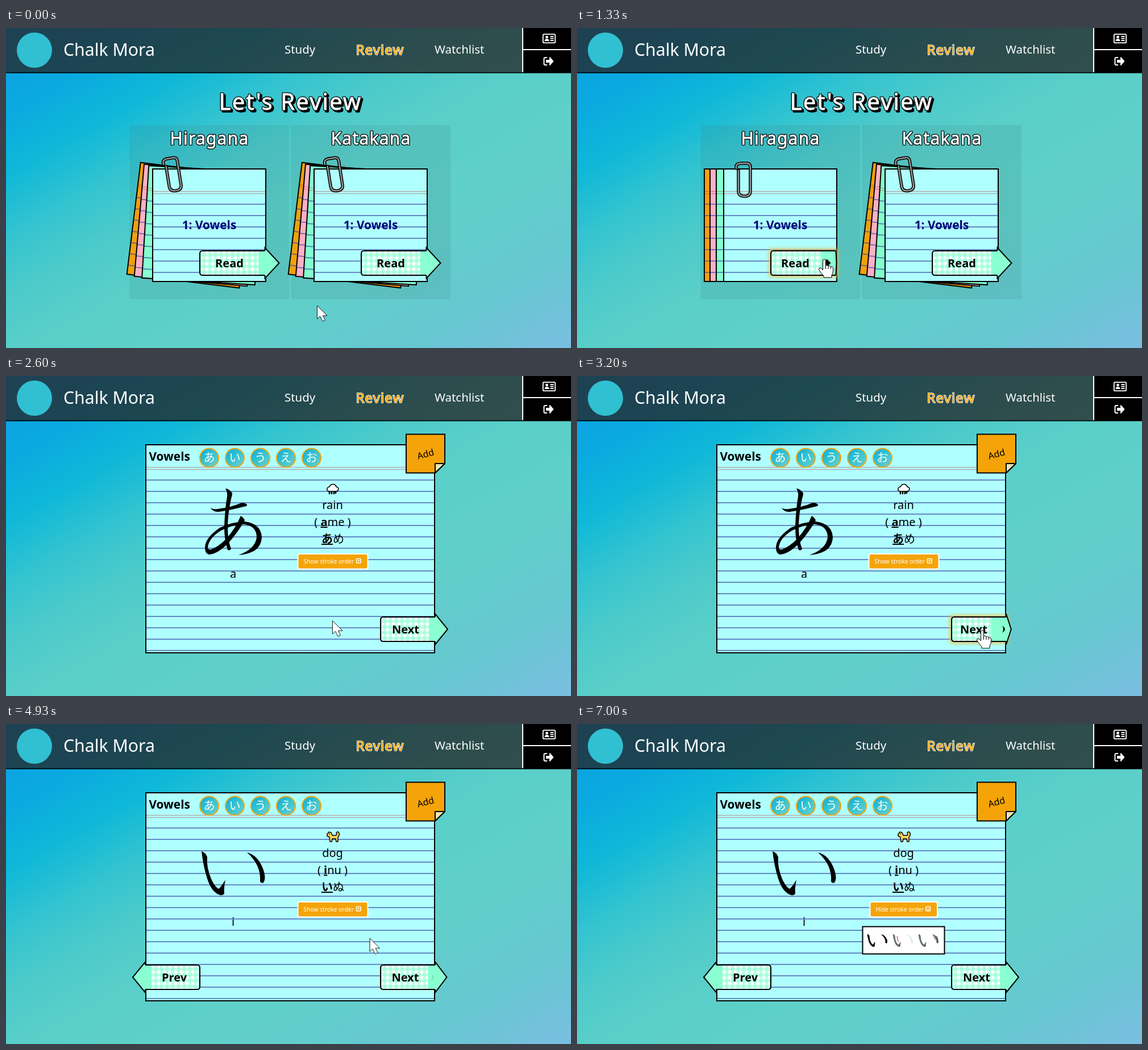
Write an HTML page that moves like this. It is 994 px wide and 563 px high and loops after 7120 ms.

```html
<!DOCTYPE html>
<html lang="en">
<head>
<meta charset="utf-8">
<title>Kana review</title>
<style>
@property --h { syntax: "<number>"; inherits: true; initial-value: 0; }
html, body { margin: 0; width: 100%; height: 100%; overflow: hidden; }
body {
  background: linear-gradient(to bottom right, #0e9fe4, #0aa9e0 13%, #0fb8d8 23%, #34c4d0 33%,
    #4ccaca 42%, #5acfc9 52%, #60cfc9 68%, #66c8d1 85%, #7abde0);
}
svg { display: block; width: 994px; height: 563px; }
text { font: 20px "Noto Sans", "Open Sans", sans-serif; }
.mid { text-anchor: middle; }
.bold { font-weight: 700; }
.kana { font-family: "Noto Sans CJK JP", "Noto Sans CJK", sans-serif; }
.rim { stroke: #000; stroke-width: 3.4px; stroke-linejoin: round; }
.core { fill: #fff; stroke: #fff; stroke-width: .8px; }
.ink { stroke: #000; stroke-width: 2px; }

/* --h runs from 0 (idle) to 1 (hovered) */
.tilt { transform: rotate(calc(var(--a) * (1 - var(--h)))); }
.clip { transform: translateY(calc(-9px * (1 - var(--h)))) rotate(calc(-9deg * (1 - var(--h)))); }
.glow { opacity: var(--h); filter: blur(3.5px); }
.mark { opacity: var(--h); }
.label { transform: translateX(calc(var(--dx) * var(--h))); }
.fill { transform-box: fill-box; transform-origin: right; transform: scaleX(calc(1 + 1.25 * var(--h))); }
.head { transform: scale(calc(1 - (1 - var(--sx)) * var(--h)), calc(1 - (1 - var(--sy)) * var(--h))); }
.head path { vector-effect: non-scaling-stroke; }

.stack, .read, .next, .active, .cursor { animation: 7.12s linear infinite; }
.stack { animation-name: stack; }
.read { animation-name: read; }
.next { animation-name: next; }
.active { animation-name: active; stroke: #fff; stroke-width: 1.4px; paint-order: stroke; }
.cursor { animation-name: move; animation-timing-function: ease-in-out; }
@keyframes stack { 0%, 11.24% { --h: 0 } 16.15%, 100% { --h: 1 } }
@keyframes read { 0%, 11.94% { --h: 0 } 15.45%, 100% { --h: 1 } }
@keyframes next { 0%, 39.33% { --h: 0 } 42.13%, 67.42% { --h: 1 } 69.5%, 100% { --h: 0 } }
@keyframes active {
  0%, 27.09% { transform: scale(1.2); letter-spacing: .9px; fill: #f4a100 }
  27.1%, 28.1% { transform: none; letter-spacing: 0; fill: #fff }
  31.32%, 100% { transform: scale(1.2); letter-spacing: .9px; fill: #f4a100 }
}
@keyframes move {
  0%, 2.81% { transform: translate(547px, 488px); animation-timing-function: ease-in }
  11.24% { transform: translate(472px, 438px); animation-timing-function: ease-out }
  15.45%, 24.58% { transform: translate(434px, 407px) }
  27.1%, 32.3% { transform: translate(434px, 413px) }
  40.73%, 44.94% { transform: translate(712px, 447px) }
  56.18%, 63.9% { transform: translate(717px, 448px); animation-timing-function: ease-in }
  67.42% { transform: translate(690px, 423px); animation-timing-function: ease-out }
  73.03%, 75.84% { transform: translate(585px, 326px) }
  80.76%, 100% { transform: translate(814px, 294px) }
}

.step { animation: 7.12s step-end infinite; }
.menu { animation-name: menu; }
.page { animation-name: page; }
.first { animation-name: first; }
.second { animation-name: second; }
.closed { animation-name: closed; }
.open { animation-name: open; }
.seen { animation-name: seen; }
.hand { animation-name: hand; }
.point { animation-name: point; }
@keyframes menu { 0% { opacity: 1 } 27.1%, 100% { opacity: 0 } }
@keyframes page { 0% { opacity: 0 } 27.1%, 100% { opacity: 1 } }
@keyframes first { 0% { opacity: 1 } 56.18%, 100% { opacity: 0 } }
@keyframes second { 0% { opacity: 0 } 56.18%, 100% { opacity: 1 } }
@keyframes closed { 0% { opacity: 1 } 75.14%, 100% { opacity: 0 } }
@keyframes open { 0% { opacity: 0 } 75.14%, 100% { opacity: 1 } }
@keyframes seen { 0% { opacity: 1 } 87.08%, 100% { opacity: 0 } }
@keyframes hand {
  0%, 27.1%, 67.42%, 76.97%, 100% { opacity: 0 }
  11.94%, 39.33%, 72.33% { opacity: 1 }
}
@keyframes point {
  0%, 27.1%, 67.42%, 76.97%, 100% { opacity: 1 }
  11.94%, 39.33%, 72.33% { opacity: 0 }
}
</style>
</head>
<body>
<svg viewBox="0 0 994 563" xmlns="http://www.w3.org/2000/svg">
  <defs>
    <linearGradient id="sea" x2="1" y2="1">
      <stop stop-color="#0ba8e0"/><stop offset=".45" stop-color="#32c3d0"/><stop offset="1" stop-color="#74cfcc"/>
    </linearGradient>
    <pattern id="gingham" x="5" y="5" width="10" height="10" patternUnits="userSpaceOnUse">
      <path fill="#fff" d="M0 0H10V10H0Z"/>
      <path fill="#8affd2" fill-opacity=".55" d="M0 0H5V10H0Z"/>
      <path fill="#8affd2" fill-opacity=".55" d="M0 0H10V5H0Z"/>
    </pattern>
    <path id="i1" d="M344 224Q351 226 354 234Q352 252 362 275Q369 288 374 290Q379 286 386 274Q383 288 384 298Q382 302 377 301Q362 297 354 272Q347 250 344 224Z"/>
    <path id="i2" d="M424 226Q444 231 453 257Q458 272 453 279Q449 281 447 277Q449 248 424 226Z"/>
  </defs>

  <g id="header">
    <path fill="#232323" fill-opacity=".75" d="M0 0H908V77.500H0Z"/>
    <path d="M0 77.500H994V79.500H0ZM910 0H994V79H910Z"/>
    <path fill="#fff" d="M908 0H910V77.500H908ZM910 37H994V39H910Z"/>
    <circle cx="50" cy="39" r="31" fill="#30c0d2"/>
    <g fill="#fff">
      <text x="101" y="49" style="font-size:30.2px">Chalk Mora</text>
      <text x="490" y="45" style="font-size:20.4px">Study</text>
      <text x="754" y="45" style="font-size:20.4px">Watchlist</text>
      <g transform="translate(658 38)"><text class="mid active" y="7.5">Review</text></g>
      <rect x="944.800" y="10.800" width="21.400" height="15.400" rx="2" fill="none" stroke="#fff" stroke-width="1.800"/>
      <circle cx="951.5" cy="16" r="2.4"/>
      <path d="M947.5 23Q947.5 19 951.5 19T955.5 23ZM957.5 14H963.5V16H957.5ZM957.5 17.5H963.5V19.5H957.5ZM957.5 21H963.5V23H957.5Z"/>
      <path d="M952 52H948.5Q946.500 52 946.500 54V63Q946.500 65 948.500 65H952" fill="none" stroke="#fff" stroke-width="2"/>
      <path d="M950 56H956V52Q956 50.500 957.500 51.500L963.500 58.500L957.500 65.500Q956 66.500 956 65V61H950Z"/>
    </g>
  </g>

  <g id="menu" class="step menu"></g>
  <g id="page" class="step page"></g>

  <g class="step seen"><g class="cursor" fill="#fff" stroke="#000" stroke-linejoin="round">
    <path class="step point" stroke-width=".9" d="M.5 .5V24L5.500 19L10 28L14.500 26L10.500 18H18Z"/>
    <path class="step hand" d="M-1.500 3Q-1.500 0 1 0T3.500 3V11Q6 9 8 12Q11 10 12.500 13Q16 12 16.500 16V21Q16 25 14 28V32H0V29Q-6 23 -8.500 18Q-9 15 -6 15Q-4 15 -1.500 19ZM3.500 11V17M8 12V17M12.500 13V17"/>
  </g></g>
</svg>

<script>
const MINT = '#8affd2', ORANGE = '#f4a408', ICE = '#b0ffff';

const at = (x, y, body, attrs = '') => `<g transform="translate(${x} ${y})" ${attrs}>${body}</g>`;
const mid = (x, y, body, cls = '', style = '') =>
  `<text class="mid ${cls}" x="${x}" y="${y}" style="${style}">${body}</text>`;
const outlined = (x, y, body, style) => mid(x, y, body, 'rim', style) + mid(x, y, body, 'core', style);

function paper(x, y, w, h, fill) {
  let rules = '';
  for (let r = 62; r < h; r += 20) rules += `M0 ${r}H${w}`;
  return at(x, y, `<rect width="${w}" height="${h}" fill="${fill}"/>
    <path d="M0 39.500H${w}M0 43.500H${w}" stroke="#be3c3c" stroke-opacity=".55"/>
    <path d="${rules}" stroke="#3c50a8" stroke-opacity=".66" stroke-width="2"/>
    <rect class="ink" width="${w}" height="${h}" fill="none"/>`);
}

// Tab button with an arrow head on its right, or on its left when flipped
function tab(x, y, w, label, o) {
  const mark = o.diamond ? 'M-6 0L0 -7L7 0L0 7Z' : 'M-3 -6Q7 0 -3 6Q1 0 -3 -6Z';
  const shape = `<rect class="glow" x="-3" y="-3" width="${w + 6}" height="49" fill="#e8c04a"/>
    <path class="ink" fill="${MINT}" d="M${w} 0H5Q0 0 0 5V38Q0 43 5 43H${w}"/>
    <rect x="2" y="1" width="${w - 12}" height="41" rx="3" fill="url(#gingham)"/>
    <rect class="fill" x="${w - 11}" y="1" width="12" height="41" fill="${MINT}"/>
    ${at(w, 21.5, `<g class="head"><path class="ink" fill="${MINT}" d="M0 -21.500V-27L${o.tip} 0L0 27V21.500"/></g>`)}
    ${at(w - (o.diamond ? 16 : 4), 21.5, `<path class="mark" d="${mark}"/>`)}`;
  return at(x, y, `<g ${o.flip ? 'transform="scale(-1 1)"' : ''}>${shape}</g>
    ${mid(o.text, 28.5, label, 'bold label')}`,
    `class="${o.cls || ''}" style="--dx:${o.dx}px;--sx:${o.sx};--sy:${o.sy}"`);
}

const clip = 'M280 247C279 240 283 238 289 238H299Q305 238 305 245V287Q305 296 295 296Q284 296 284 287V251';

function stack(x, title, live) {
  const back = [[324, 7, '#f0a00c'], [334, 5, '#ffb0c4'], [345, 3.5, '#84ffcf']]
    .map(([cx, a, fill]) => at(cx, 347,
      `<g class="tilt" style="--a:${a}deg">${paper(-100, -99, 199, 198, fill)}</g>`)).join('');
  return at(x, 0, `<rect x="217.500" y="171" width="280.500" height="306" fill="#407878" fill-opacity=".15"/>
    ${outlined(358, 205, title, 'font-size:30px;letter-spacing:1.2px')}
    <g class="${live ? 'stack' : ''}">${back}${paper(258, 248, 199, 198, ICE)}
      ${at(292, 267, `<g class="clip"><g transform="translate(-292 -267)" fill="none" stroke-linecap="round">
        <path d="${clip}" stroke="#000" stroke-width="5.500"/><path d="${clip}" stroke="#999" stroke-width="2.400"/></g></g>`)}
    </g>
    ${mid(357.5, 354, '1: Vowels', 'bold', 'font-size:20.8px;fill:#000078')}
    ${tab(341, 392, 114.5, 'Read', { tip: 25, text: 52, dx: -9, sx: .04, sy: .79, diamond: true, cls: live ? 'read' : '' })}`);
}

document.getElementById('menu').innerHTML =
  `<g style="filter:drop-shadow(3px 3px 0 #000)">${outlined(500.5, 144, "Let's Review", 'font-size:40px;letter-spacing:2.1px')}</g>`
  + stack(0, 'Hiragana', true) + stack(284, 'Katakana', false);

const word = (meaning, first, rest, kana, tail) => mid(574.5, 234, meaning)
  + mid(574.5, 264, `( <tspan class="bold" text-decoration="underline">${first}</tspan>${rest} )`)
  + mid(575, 294, `<tspan class="bold" text-decoration="underline">${kana}</tspan>${tail}`, 'kana')
  + mid(399.5, 355, first);

const toggle = (x, w, label, caret) => `
  <rect x="${x}" y="313" width="${w}" height="26.500" rx="3" fill="${ORANGE}" stroke="#fff" stroke-width="2"/>
  <g fill="#fff"><text x="${x + 10}" y="329.500" style="font-size:10.3px">${label}</text>
  ${at(x + w - 20, 321.5, `<rect width="7.500" height="7.500" rx="1" fill="none" stroke="#fff" stroke-width="1.600"/><path d="${caret}"/>`)}</g>`;

const mini = (x, left, right) => `<g transform="translate(${x} 307.300) scale(.31 .28)">
  <use href="#i1" fill="${left}" stroke="${left}" stroke-width="3"/><use href="#i2" fill="${right}" stroke="${right}" stroke-width="3"/></g>`;

const dots = [...'あいうえお'].map((k, i) => at(357.5 + 45 * i, 144,
  `<circle r="16.500" fill="url(#sea)" stroke="${ORANGE}" stroke-width="2"/>${mid(0, 7, k, 'kana', 'fill:#fff')}`)).join('');

document.getElementById('page').innerHTML = `
  ${paper(246, 121, 508, 366, ICE)}
  <text class="bold" x="251.500" y="149" style="font-size:20.8px">Vowels</text>${dots}
  <path class="ink" fill="${ORANGE}" d="M704 102.500H772V154L755 170.500H704Z"/>
  <path class="ink" fill="#ece5b4" stroke-linejoin="round" d="M755 154H772L755 170.500Z"/>
  ${at(738, 137, `<g transform="rotate(-15)">${mid(0, 6, 'Add', '', 'font-size:16px')}</g>`)}

  <g class="step first">
    <path d="M359 231Q363 235 372 234Q396 231 412 224Q418 221 424 226Q425 229 418 230Q395 236 374 239Q365 240 359 231Z"/>
    <path d="M386 198Q392 198 398 206Q398 210 396 216Q390 245 390 265Q390 290 396 304Q394 308 390 306Q384 290 384 265Q385 235 389 212Q390 205 386 198Z"/>
    <path d="M413 246Q418 249 420 254Q408 275 392 293Q372 314 356 314Q350 311 350 302Q350 285 376 267Q400 256 420 256Q449 260 450 284Q449 300 436 308Q424 314 409 315Q438 305 441 284Q441 264 419 261Q400 261 378 272Q356 286 355 302Q356 306 361 305Q374 300 387 287Q404 268 413 246Z"/>
    <path d="M568 203Q564 202 565 198Q566 195 569 195Q571 190 576 190.500Q580 191 581 195Q585 196 585 199Q584 203 580 203Z" fill="#fff" stroke="#000" stroke-width="1.500"/>
    <path d="M569 203.500V207M573 203.500V207M577 203.500V207M580 203.500V206" stroke="#000" stroke-width="2.500" stroke-linecap="round"/>
    ${word('rain', 'a', 'me', 'あ', 'め')}
  </g>
  <g class="step second">
    <use href="#i1"/><use href="#i2"/>
    <path d="M565 194L568 190L572 191L574 196H580Q583 195 581 191Q584 188 586 192Q587 196 584 199V207H581L580 202H574L573 207H570L569 199L565 197Z" fill="#ffd45e" stroke="#000" stroke-width="1.500" stroke-linejoin="round"/>
    <circle cx="569" cy="193.500" r=".9"/>
    ${word('dog', 'i', 'nu', 'い', 'ぬ')}
    ${tab(341, 424, 96, 'Prev', { tip: 22, text: -45, dx: 0, sx: 1, sy: 1, flip: true })}
  </g>

  <g class="step closed">${toggle(513.5, 123, 'Show stroke order', 'M1.500 2.500H6L3.750 5.500Z')}</g>
  <g class="step open">
    ${toggle(515.5, 118.5, 'Hide stroke order', 'M1.500 5.500H6L3.750 2.500Z')}
    <rect class="ink" x="502.500" y="356.500" width="144" height="48" fill="#fff"/>
    ${mini(404.4, '#000', '#000')}${mini(449.4, '#5b6b69', '#e2ece9')}${mini(494.4, '#5b6b69', '#4b5f59')}
    <path d="M563 373L565 383M627 374L632 380" stroke="#e0637c" stroke-width="1.500"/>
    <path d="M632 373L635 378" stroke="#3f9a74" stroke-width="1.500"/>
  </g>
  ${tab(659, 424, 96, 'Next', { tip: 22, text: 44, dx: -5, sx: .4, sy: 1, cls: 'next' })}`;
</script>
</body>
</html>
```
